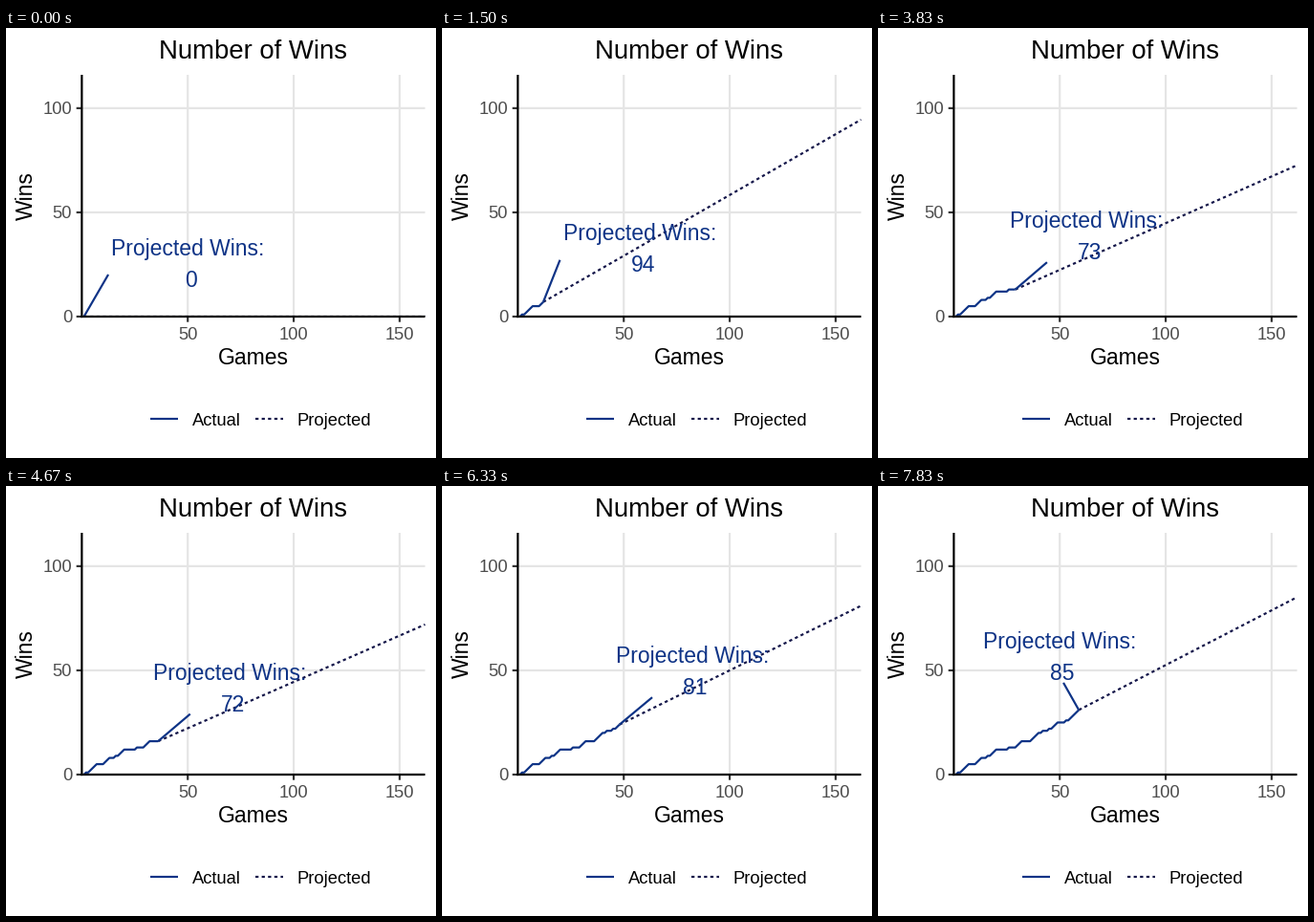
Recreate the animation shown at these times as a matplotlib script. Size 450x450 px, loop 8 s.

```python
import matplotlib.pyplot as plt
import numpy as np
from matplotlib.animation import FuncAnimation
from matplotlib.patches import Rectangle

SIZE, DPI = 450, 100
LOOP, TICK = 8000, 20  # ms
STEPS = 48  # poses in one loop
SEASON = 162
PT = 72 / DPI  # points per pixel

BLUE, NAVY = "#0E3386", "#15174A"
GRID, TICK_TEXT = "#E5E5E5", "#4D4D4D"
LEFT, RIGHT, TOP, BOTTOM = 79.35, 438.54, 49, 302
LINE = 2.2 * PT
DASHES = (0, (1.5, 1.5))

RESULTS = "LWLWWWWLLLWWWLLWLWWWLLLLLWLLLWWWLLLLWWWWLWLLWLWWWLLLWLWWWWW"
WINS = np.cumsum([r == "W" for r in RESULTS])
GAMES = np.arange(1, len(RESULTS) + 1)

plt.rcParams["font.family"] = "Liberation Sans"
plt.rcParams["path.snap"] = False


def px(game):
    return LEFT + game * (RIGHT - LEFT) / SEASON


def py(wins):
    return BOTTOM - wins * (BOTTOM - TOP) / 116


fig = plt.figure(figsize=(SIZE / DPI, SIZE / DPI), dpi=DPI, facecolor="white")
ax = fig.add_axes([0, 0, 1, 1])
ax.set_xlim(0, SIZE)
ax.set_ylim(SIZE, 0)
ax.axis("off")


def line(xs, ys, color, z, **kw):
    kw.setdefault("solid_capstyle", "butt")
    return ax.plot(xs, ys, color=color, lw=LINE, zorder=z, **kw)[0]


def text(x, y, s, size, color="black", ha="center", **kw):
    return ax.text(x, y, s, fontsize=size * PT, color=color, ha=ha,
                   va="baseline", **kw)


# Grid, ticks and axes
for g in (50, 100, 150):
    line([px(g)] * 2, [TOP, BOTTOM], GRID, 1)
    line([px(g)] * 2, [BOTTOM, BOTTOM + 5.7], "#333333", 5)
    text(px(g), 326.5, str(g), 18.33, TICK_TEXT)
for w in (0, 50, 100):
    line([LEFT, RIGHT], [py(w)] * 2, GRID, 1)
    line([LEFT - 5.7, LEFT], [py(w)] * 2, "#333333", 5)
    text(69, py(w) + 6.5, str(w), 18.33, TICK_TEXT, "right")
line([LEFT, LEFT], [TOP, BOTTOM + 1.1], "black", 6)
line([LEFT - 1.1, RIGHT], [BOTTOM, BOTTOM], "black", 6)

MID = (LEFT + RIGHT) / 2
text(MID, 32, "Number of Wins", 27.5)
text(MID, 352.5, "Games", 22.9)
text(28, 175.5, "Wins", 22.9, rotation=90, rotation_mode="anchor")

# Legend
line([151, 180], [409, 409], BLUE, 3)
line([261, 290], [409, 409], NAVY, 3, ls=DASHES, dash_capstyle="butt")
text(194.5, 416.3, "Actual", 18.33, ha="left")
text(304.3, 416.3, "Projected", 18.33, ha="left")

# Moving parts
projected = line([], [], NAVY, 2, ls=DASHES, dash_capstyle="butt")
actual = line([], [], BLUE, 3, solid_joinstyle="round")
leader = line([], [], BLUE, 3)
caption = text(0, 0, "Projected Wins:", 22.9, BLUE, zorder=4)
number = text(0, 0, "", 22.9, BLUE, zorder=4)
panel = Rectangle((LEFT, TOP), RIGHT - LEFT, BOTTOM - TOP,
                  transform=ax.transData)
for part in (projected, actual):
    part.set_clip_path(panel)


def label_center(step, x):
    if step >= 41:
        return 190
    return x + np.interp(step, [0, 9, 16, 23, 38], [109, 101, 91, 75, 76])


def leader_end(cx, x, y):
    """Where the leader meets the label box."""
    edge = cx - 83.5
    if x < edge:
        return edge, y - 44
    if abs(x - cx) < 35:
        return cx + 0.2 * (x - cx), y - 28.5
    return (edge + cx) / 2, y - 28.5


def update(frame):
    # Steps change on the nearest tick
    step = int((frame + 0.7) * TICK * STEPS / LOOP)
    game = int(1 + (step + 0.5) / 0.812)
    wins = int(WINS[game - 1])
    total = SEASON * wins / game
    x, y = px(game), py(wins)
    cx = label_center(step, x)
    ex, ey = leader_end(cx, x, y)

    actual.set_data(px(GAMES[:game]), py(WINS[:game]))
    projected.set_data([x, px(SEASON)], [y, py(total)])
    leader.set_data([x, ex], [y, ey])
    caption.set_position((cx, y - 64.3))
    number.set_position((cx + 3.2, y - 31.3))
    number.set_text(str(round(total)))
    return projected, actual, leader, caption, number


anim = FuncAnimation(fig, update, frames=LOOP // TICK, interval=TICK,
                     repeat=True, repeat_delay=0)
plt.show()
```
